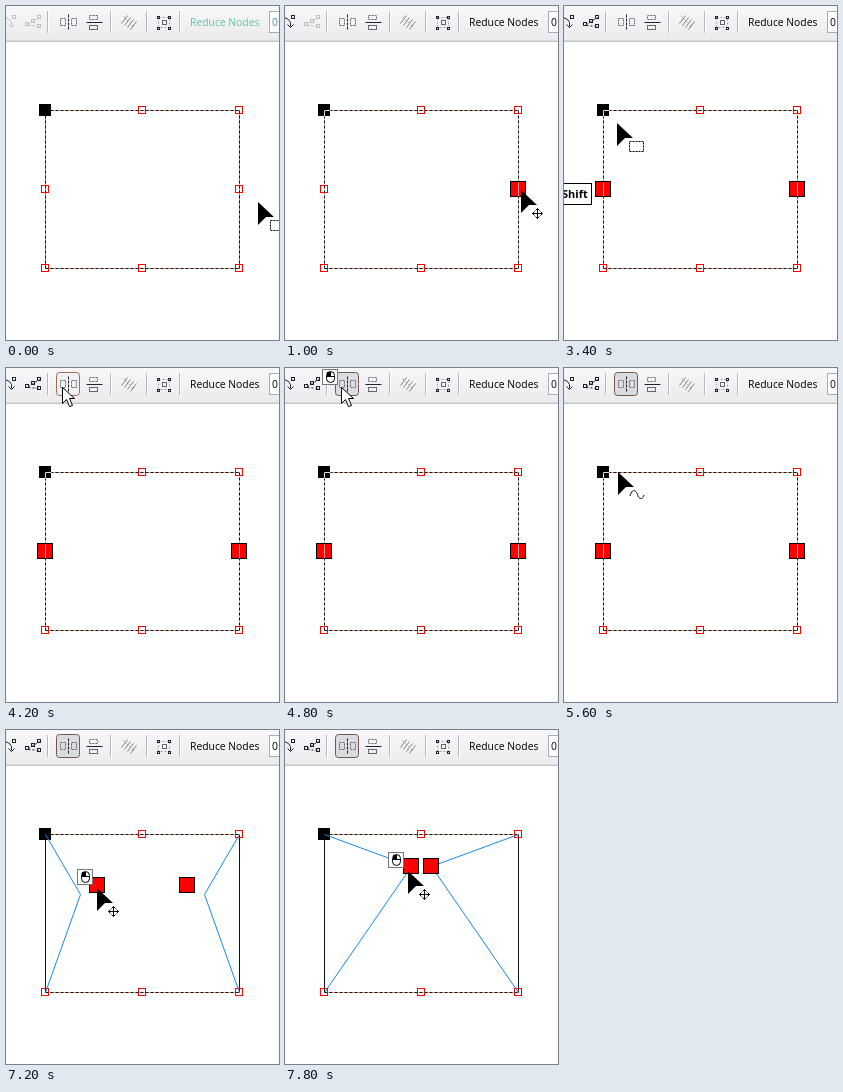
Write an HTML page with a canvas that moves like this. It is 273 px wide and 334 px high and loops after 8000 ms.

```html
<!DOCTYPE html>
<html lang="en">
<head>
<meta charset="utf-8">
<title>Mirrored node editing</title>
<style>
html, body { margin: 0; width: 100%; height: 100%; overflow: hidden; background: #fff; }
canvas { display: block; }
</style>
</head>
<body>
<canvas id="stage" width="273" height="334"></canvas>
<script>
const ctx = document.getElementById('stage').getContext('2d');
const LOOP = 8000, STEP = 200;
const L = 39, R = 233, T = 104, B = 262, MX = 136, MY = 183;
const RED = '#f00', INK = '#202030', SOFT = '#66666e', FADED = '#c0c0c4';
const LABEL = '10.35px "Open Sans", sans-serif';

// Pointer tip: [time, x, y]
const POINTER = [
  [0, 252, 196], [600, 236, 184], [1200, 236, 184], [2000, 44, 184], [2200, 45, 184],
  [3200, 45, 184], [3400, 53, 117], [3600, 56, 70], [4000, 57, 20], [5200, 57, 20],
  [5600, 54, 104], [6200, 43, 184], [6600, 43, 184], [7600, 123, 141], [8000, 123, 141]
];
// Left node while it is dragged
const DRAG = [[6600, L, MY], [7600, 126, 136], [8000, 126, 136]];

function along(track, t) {
  if (t <= track[0][0]) return track[0].slice(1);
  const i = track.findIndex(k => k[0] >= t);
  const [t0, x0, y0] = track[i - 1], [t1, x1, y1] = track[i];
  const k = (t - t0) / (t1 - t0);
  return [Math.round(x0 + (x1 - x0) * k), Math.round(y0 + (y1 - y0) * k)];
}

const between = (t, from, to) => t >= from && t < to;

function fill(x, y, w, h, color) {
  ctx.fillStyle = color;
  ctx.fillRect(x, y, w, h);
}

function frame(x, y, w, h, color, dash = []) {
  ctx.strokeStyle = color;
  ctx.setLineDash(dash);
  ctx.strokeRect(x + .5, y + .5, w - 1, h - 1);
  ctx.setLineDash([]);
}

function path(points, color, dash = []) {
  ctx.beginPath();
  points.forEach(([x, y]) => ctx.lineTo(x + .5, y + .5));
  ctx.strokeStyle = color;
  ctx.setLineDash(dash);
  ctx.stroke();
  ctx.setLineDash([]);
}

function text(str, x, y, color, font) {
  ctx.font = font;
  ctx.fillStyle = color;
  ctx.fillText(str, x, y);
}

function box(x, y, size, color, inner) {
  const h = size >> 1;
  if (inner) fill(x - h, y - h, size, size, inner);
  frame(x - h, y - h, size, size, color);
}

function toolbar(t) {
  const shade = ctx.createLinearGradient(0, 0, 0, 34);
  shade.addColorStop(0, '#f8f8fa');
  shade.addColorStop(1, '#ebebee');
  fill(0, 0, 273, 34, shade);
  fill(0, 34, 273, 1, '#dcdcdf');
  fill(0, 35, 273, 1, '#c4c4c8');
  [41, 104, 140, 173].forEach(x => {
    fill(x, 5, 1, 22, '#b8b8be');
    fill(x + 1, 5, 1, 22, '#fff');
  });

  // convert to curve
  const one = t >= 800, two = t >= 2400;
  const curveColor = one ? INK : FADED;
  path([[-1, 11], [3, 13], [5, 16], [5, 20]], curveColor);
  path([[2, 18], [5, 21], [8, 18]], curveColor);
  box(8, 11, 4, curveColor);
  // join nodes
  const joinColor = two ? INK : FADED;
  path([[22, 18], [33, 11]], joinColor, [2, 2]);
  path([[22, 19], [33, 20]], joinColor, [2, 2]);
  [[21, 18], [27, 15], [33, 11], [33, 20]].forEach(([x, y]) => box(x, y, 4, joinColor));

  if (t >= 4000) {
    const pressed = t >= 4800;
    ctx.beginPath();
    ctx.roundRect(50.5, 4.5, 23, 23, 3);
    ctx.fillStyle = pressed ? '#dcdce0' : '#f1f0f0';
    ctx.fill();
    ctx.strokeStyle = pressed ? '#6b5a55' : '#a56a58';
    ctx.stroke();
  }
  // reflect horizontally
  frame(54, 12, 6, 8, SOFT, [2, 1]);
  frame(65, 12, 6, 8, SOFT, [2, 1]);
  path([[62, 8], [62, 24]], INK, [3, 1]);
  // reflect vertically
  frame(83, 9, 9, 5, SOFT, [2, 1]);
  frame(83, 19, 9, 5, SOFT);
  path([[80, 16], [96, 16]], INK);
  // elastic mode
  for (let i = 0; i < 4; i++) path([[115 + i * 3, 17 + i * 2], [121 + i * 3, 9 + i * 2]], '#808086');
  path([[117, 10], [128, 21]], '#a0a0a6', [2, 2]);
  // bounding box
  frame(152, 11, 12, 11, '#a0a0a6', [2, 2]);
  [[152, 11], [163, 11], [152, 22], [163, 22]].forEach(([x, y]) => box(x, y, 3, INK));
  box(158, 16, 5, SOFT);

  text('Reduce Nodes', 184, 20, one ? '#000' : '#5fc3a5', LABEL);
  fill(263, 5, 12, 22, '#fff');
  frame(263, 5, 14, 22, '#a3adbb');
  text('0', 266, 20, one ? '#000' : '#4788b8', LABEL);
}

function shape(t, pointer) {
  const dragging = t >= 6800;
  const side = t < 6600 ? null : dragging ? '#111' : '#777';
  const edge = (points, gap, solid) => {
    path(points, solid || gap);
    if (!solid) path(points, '#111', [3, 2]);
  };
  const sideGap = t < 800 ? '#f0906c' : '#ddd';
  edge([[L, T], [R, T]], '#f0a888');
  edge([[L, B], [R, B]], '#f0a888');
  edge([[L, T], [L, B]], sideGap, side);
  edge([[R, T], [R, B]], sideGap, side);

  fill(L - 6, T - 6, 12, 12, '#000');
  if (between(t, 800, 6600)) path([[L + 6, T], [L, T], [L, T + 6]], '#ddd');

  [[MX, T], [R, T], [L, B], [MX, B], [R, B]].forEach(([x, y]) => box(x, y, 8, RED));

  if (dragging) {
    const [bx, by] = along(DRAG, t - (t < 7800 ? STEP : 0));
    path([[L, T], [bx, by], [L, B]], '#1687e8');
    path([[R, T], [L + R - bx, by], [R, B]], '#1687e8');
  }
  const [nx, ny] = along(DRAG, t);
  [[nx, t >= 2400], [L + R - nx, t >= 800]].forEach(([x, selected]) => {
    const hovered = Math.hypot(pointer[0] - x, pointer[1] - ny) < 10;
    if (selected) {
      box(x, ny, 16, '#000', RED);
      if (!dragging) path([[x, ny - 7], [x, ny + 7]], side ? '#c05050' : '#ff9c9c');
    } else {
      box(x, ny, hovered ? 20 : 8, RED, hovered && '#fff');
      if (hovered) path([[x, ny - 9], [x, ny + 9]], '#ddd', [3, 2]);
    }
  });
}

function polygon(x, y, points, color, outline) {
  ctx.beginPath();
  points.forEach(([dx, dy]) => ctx.lineTo(x + dx, y + dy));
  ctx.closePath();
  ctx.fillStyle = color;
  ctx.fill();
  if (outline) {
    ctx.strokeStyle = outline;
    ctx.stroke();
  }
}

function moveMark(x, y) {
  path([[x - 5, y], [x + 5, y]], '#000');
  path([[x, y - 5], [x, y + 5]], '#000');
  [[1, 0], [-1, 0], [0, 1], [0, -1]].forEach(([dx, dy]) => {
    path([[x + dx * 3 - dy * 2, y + dy * 3 - dx * 2], [x + dx * 5, y + dy * 5],
      [x + dx * 3 + dy * 2, y + dy * 3 + dx * 2]], '#000');
  });
}

function cursor(t, [x, y]) {
  if (y < 36) {
    polygon(x - .5, y - .5, [[0, 0], [0, 16], [4, 12], [7, 19], [10, 18], [7, 11], [12, 11]], '#fff', '#000');
    return;
  }
  polygon(x, y, [[0, 0], [16, 15], [8, 15], [0, 23]], '#000');
  const overNode = between(t, 600, 1400) || between(t, 2000, 3400) || t >= 6200;
  if (overNode) {
    moveMark(x + 16, y + 23);
  } else if (Math.abs(y - T) < 6) {
    ctx.beginPath();
    ctx.moveTo(x + 12, y + 24);
    ctx.bezierCurveTo(x + 15, y + 14, x + 19, y + 20, x + 20, y + 24);
    ctx.bezierCurveTo(x + 22, y + 28, x + 25, y + 27, x + 26, y + 23);
    ctx.strokeStyle = '#000';
    ctx.stroke();
  } else {
    frame(x + 12, y + 18, 15, 11, '#000', [2, 1]);
  }
}

function mouseBadge([tipX, tipY]) {
  const x = tipX - 20, y = tipY - 19;
  fill(x, y, 16, 16, '#fff');
  frame(x, y, 16, 16, '#777');
  ctx.beginPath();
  ctx.roundRect(x + 4.5, y + 2.5, 8, 11, 4);
  ctx.strokeStyle = '#000';
  ctx.stroke();
  fill(x + 5, y + 3, 4, 5, '#000');
  path([[x + 4, y + 7], [x + 12, y + 7]], '#000');
}

function draw(t) {
  const pointer = along(POINTER, t);
  fill(0, 0, 273, 334, '#fff');
  toolbar(t);
  shape(t, pointer);

  if (between(t, 2200, 3600)) {
    fill(0, 177, 28, 22, '#fff');
    frame(-2, 177, 30, 22, '#000');
    text('Shift', -2, 192, '#000', 'bold 11px "Noto Sans", sans-serif');
  }
  if (between(t, 6200, 6800)) text('node', 50, 185, '#c80000', '8.5px "DejaVu Sans", sans-serif');

  cursor(t, pointer);
  const clicking = between(t, 800, 1000) || between(t, 2400, 2800) || between(t, 4600, 5200) || t >= 6600;
  if (clicking) mouseBadge(pointer);
}

function tick() {
  const t = performance.now() % LOOP;
  draw(Math.floor(t / STEP) * STEP);
  requestAnimationFrame(tick);
}
tick();
</script>
</body>
</html>
```
